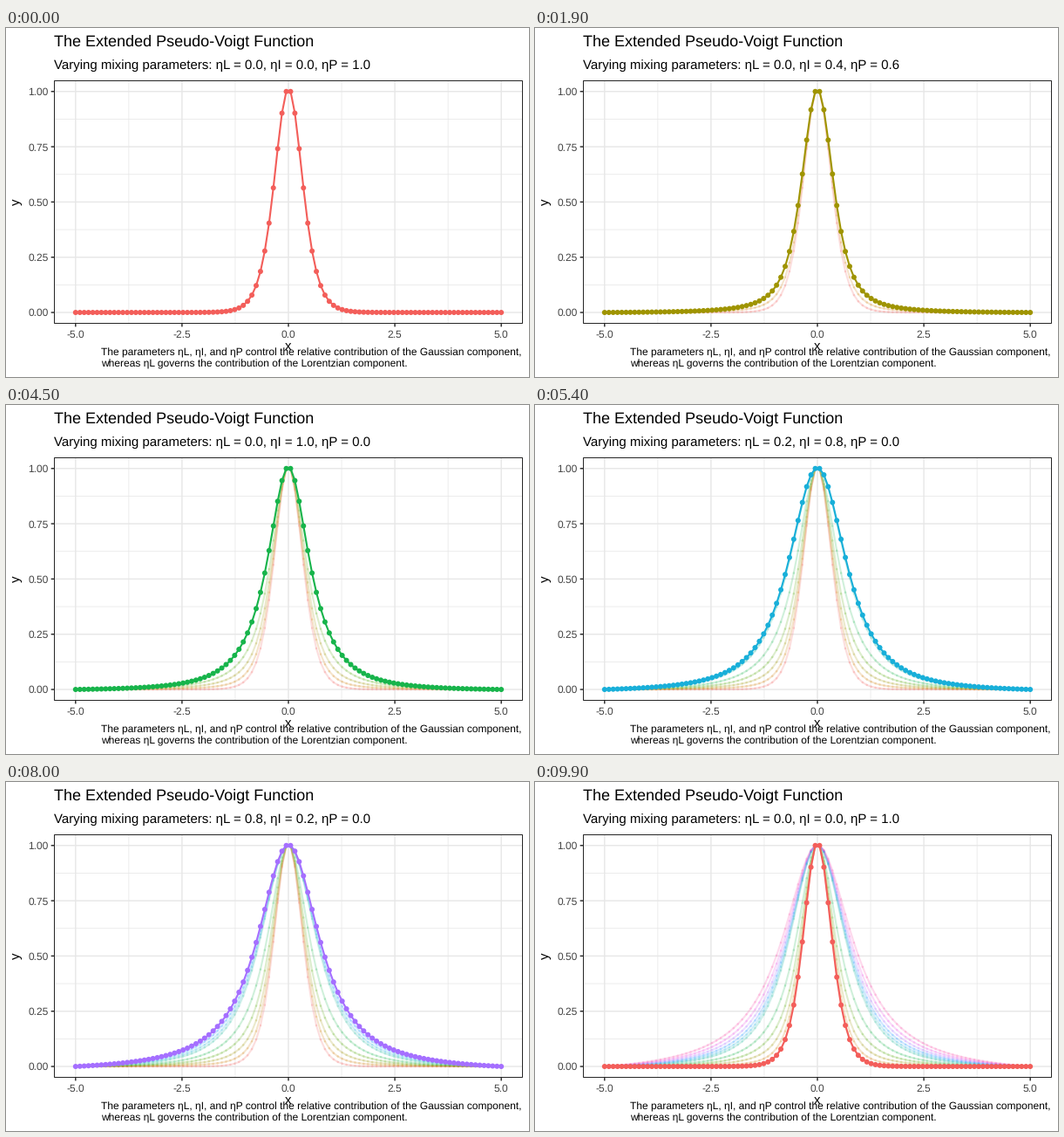
Write a matplotlib script that moves like this. It is 600x400 px and loops after 10000 ms.

```python
import numpy as np
import matplotlib.pyplot as plt
from matplotlib.animation import FuncAnimation

plt.rcParams["font.family"] = "Liberation Sans"
plt.rcParams["text.hinting"] = "none"

W, H, DPI = 600, 400, 100
PX = 72 / DPI  # points per pixel
LEFT, RIGHT, TOP, BOTTOM = 55.4, 592.6, 60.1, 338.7
GRID, BORDER, TICK_TEXT = "#e7e7e7", "#262626", "#434343"
COLORS = ["#f35e5a", "#d17b00", "#9f9400", "#53a805", "#17b44b", "#18b79a",
          "#18afd9", "#1890ff", "#a56fff", "#e846e2", "#fd43a5"]

# Tenths of a second at which the subtitle and the curve step forward
LABEL_STEPS = np.array([7, 17, 27, 36, 45, 53, 62, 71, 80, 89, 98])
CURVE_STEPS = np.array([9, 19, 28, 37, 46, 54, 63, 72, 81, 90, 99])


def to_x(x):
    return (LEFT + RIGHT) / 2 + x * (RIGHT - LEFT) / 11


def to_y(y):
    return BOTTOM - (y + 0.05) * (BOTTOM - TOP) / 1.1


def mixing(k):
    """Weights (L, I, P) of step k, going from pure P over I to pure L."""
    if k <= 5:
        return 0, k / 5, (5 - k) / 5
    return (k - 5) / 5, (10 - k) / 5, 0


def profile(x, k, width=0.44):
    eta_l, eta_i, eta_p = mixing(k)
    lorentz = 1 / (np.pi * (1 + x**2))
    middle = 0.5 * (1 + x**2) ** -1.5
    sech2 = 1 / (2 * width * np.cosh(x / width) ** 2)
    y = eta_l * lorentz + eta_i * middle + eta_p * sech2
    return (y - y.min()) / (y.max() - y.min())


def subtitle_text(k):
    return ("Varying mixing parameters: "
            "ηL = %.1f, ηI = %.1f, ηP = %.1f" % mixing(k))


fig = plt.figure(figsize=(W / DPI, H / DPI), dpi=DPI, facecolor="white")
ax = fig.add_axes([0, 0, 1, 1])
ax.set_xlim(0, W)
ax.set_ylim(H, 0)
ax.axis("off")


def stroke(xs, ys, color, width, z, **kw):
    line, = ax.plot(xs, ys, color=color, lw=width * PX, zorder=z, snap=False,
                    solid_capstyle="butt", **kw)
    return line


def write(x, y, text, size, color="black", **kw):
    return ax.text(x, y, text, size=size * PX, color=color, zorder=20,
                   va="baseline", **kw)


def draw_frame():
    for x in (-3.75, -1.25, 1.25, 3.75):
        stroke([to_x(x)] * 2, [TOP, BOTTOM], GRID, 0.75, 0)
    for y in (0.125, 0.375, 0.625, 0.875):
        stroke([LEFT, RIGHT], [to_y(y)] * 2, GRID, 0.75, 0)
    for x in (-5, -2.5, 0, 2.5, 5):
        px = to_x(x)
        stroke([px, px], [TOP, BOTTOM], GRID, 1.42, 1)
        stroke([px, px], [BOTTOM, BOTTOM + 3.7], BORDER, 1.42, 10)
        write(px, 355, f"{x:.1f}", 12, TICK_TEXT, ha="center")
    for y in (0, 0.25, 0.5, 0.75, 1):
        py = to_y(y)
        stroke([LEFT, RIGHT], [py, py], GRID, 1.42, 1)
        stroke([LEFT - 3.7, LEFT], [py, py], BORDER, 1.42, 10)
        write(48.8, py + 4.3, f"{y:.2f}", 12, TICK_TEXT, ha="right")
    # The border is one crisp pixel wide
    ax.add_patch(plt.Rectangle((55.5, 60.5), 537, 278, fill=False, ec=BORDER,
                               lw=PX, zorder=10, snap=False))


def draw_curve(k, dot, z, alpha):
    px, py = to_x(xs), to_y(profile(xs, k))
    line = stroke(px, py, COLORS[k], 2.1, z, alpha=alpha,
                  solid_joinstyle="round")
    # One line width per dot keeps the dots at subpixel positions
    dots = ax.scatter(px, py, s=(dot * PX) ** 2, color=COLORS[k], alpha=alpha,
                      linewidths=np.zeros(len(xs)), zorder=z + 0.5)
    return line, dots


xs = np.linspace(-5, 5, 100)
draw_frame()
write(55.2, 20, "The Extended Pseudo-Voigt Function", 18)
subtitle = write(55.2, 47, subtitle_text(0), 15)
write(to_x(0), 369, "x", 15, ha="center")
write(17, 199.4, "y", 15, ha="center", rotation=90, rotation_mode="anchor")
write(109.2, 376, "The parameters ηL, ηI, and ηP control the relative "
      "contribution of the Gaussian component,", 12)
write(109.2, 389, "whereas ηL governs the contribution of the "
      "Lorentzian component.", 12)

steps = range(len(COLORS))
shadows = [draw_curve(k, 2.6, 3, 0.2) for k in steps]
curves = [draw_curve(k, 6, 6, 1) for k in steps]


def show(artists, visible):
    for artist in artists:
        artist.set_visible(visible)


def update(frame):
    label = int(np.sum(LABEL_STEPS <= frame))
    current = int(np.sum(CURVE_STEPS <= frame))
    subtitle.set_text(subtitle_text(label % len(COLORS)))
    for k in steps:
        show(shadows[k], k < current)
        show(curves[k], k == current % len(COLORS))
    return [subtitle]


anim = FuncAnimation(fig, update, frames=100, interval=100, repeat=True,
                     init_func=lambda: update(0))
plt.show()
```
